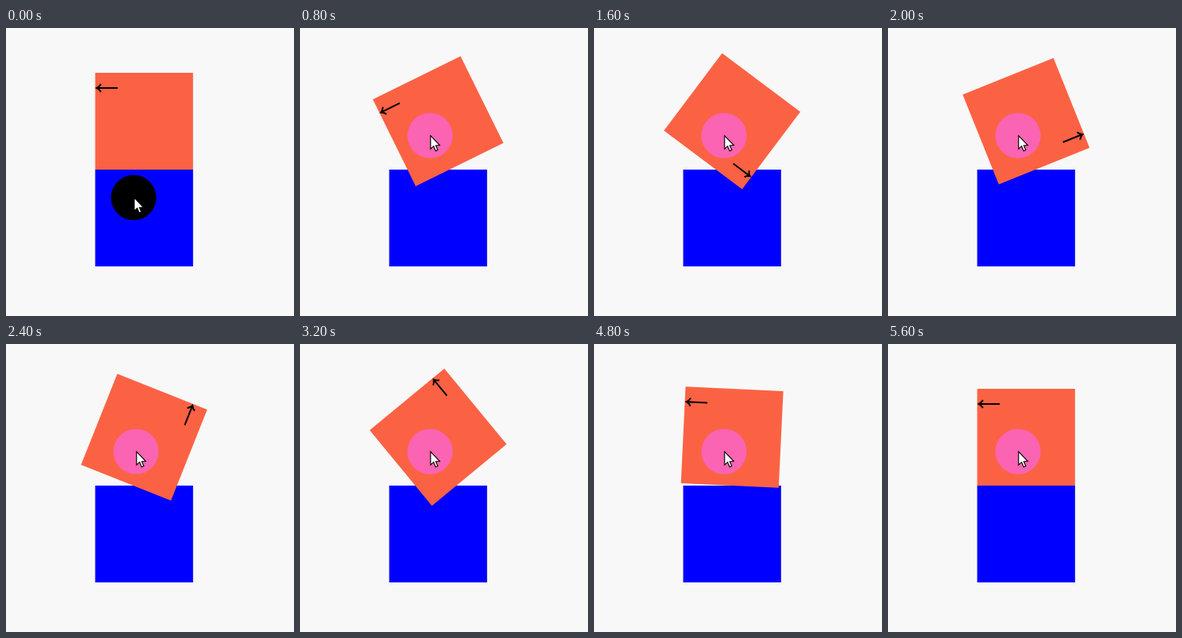
Recreate the animation shown at these times as an HTML page with a canvas. Size 360 by 360 pixels, loop 6.6 s.

```html
<!DOCTYPE html>
<html lang="en">
<head>
<meta charset="utf-8">
<title>Rotating square</title>
<style>
  html, body { margin: 0; width: 100%; height: 100%; overflow: hidden; background: #f8f8f8; }
  canvas { display: block; width: 360px; height: 360px; }
</style>
</head>
<body>
<canvas id="stage"></canvas>
<script>
const LOOP = 6600, STEP = 200;
const SPIN_START = 375, SPIN_TIME = 5000;
const BOX = { x: 111.5, y: 56, w: 122.3, h: 121 };
const MID = { x: BOX.x + BOX.w / 2, y: BOX.y + BOX.h / 2 };
const FLOOR = BOX.y + BOX.h;

const canvas = document.getElementById('stage');
const ctx = canvas.getContext('2d');
const ratio = window.devicePixelRatio || 1;
canvas.width = canvas.height = 360 * ratio;
ctx.scale(ratio, ratio);

const clamp = v => Math.min(1, Math.max(0, v));
const mix = (a, b, u) => a + (b - a) * u;
const smooth = u => u * u * (3 - 2 * u);

// CSS "ease": cubic-bezier(.25, .1, .25, 1)
function ease(x) {
  if (x <= 0 || x >= 1) return clamp(x);
  let lo = 0, hi = 1;
  for (let i = 0; i < 30; i++) {
    const s = (lo + hi) / 2;
    if (0.75 * s * (1 - s) + s ** 3 < x) lo = s; else hi = s;
  }
  const s = lo, r = 1 - s;
  return 0.3 * s * r * r + 3 * s * s * r + s ** 3;
}

function trace(points) {
  ctx.beginPath();
  points.forEach(([x, y]) => ctx.lineTo(x, y));
}

function drawArrow(x, y) {
  ctx.save();
  ctx.translate(x, y);
  ctx.strokeStyle = '#080404';
  ctx.lineWidth = 2;
  trace([[1, 0], [27, 0]]);
  ctx.stroke();
  ctx.beginPath();
  ctx.moveTo(6, -5);
  ctx.quadraticCurveTo(4, -1.5, 0.8, 0);
  ctx.quadraticCurveTo(4, 1.5, 6, 5);
  ctx.stroke();
  ctx.restore();
}

function drawSquare(angle) {
  ctx.save();
  ctx.translate(MID.x, MID.y);
  ctx.rotate(angle);
  ctx.translate(-MID.x, -MID.y);
  ctx.fillStyle = '#fb6244';
  ctx.fillRect(BOX.x, BOX.y, BOX.w, BOX.h);
  drawArrow(112.7, 75);
  ctx.restore();
}

function drawPointer(x, y) {
  ctx.save();
  ctx.translate(x, y);
  trace([[0, 0], [0, 16.5], [3.8, 13], [6.4, 19], [9, 17.8], [6.5, 12.2], [11.5, 11.8]]);
  ctx.closePath();
  ctx.fillStyle = '#fff';
  ctx.fill();
  ctx.strokeStyle = '#000';
  ctx.lineWidth = 1.1;
  ctx.stroke();
  ctx.restore();
}

function draw(t) {
  ctx.fillStyle = '#f8f8f8';
  ctx.fillRect(0, 0, 360, 360);

  ctx.fillStyle = '#0000fe';
  ctx.fillRect(BOX.x, FLOOR, BOX.w, BOX.h);
  drawSquare(-2 * Math.PI * ease((t - SPIN_START) / SPIN_TIME));

  const u = smooth(clamp((t - 100) / 500));
  const x = mix(159.5, 162.5, u), y = mix(212, 134.5, u);
  ctx.fillStyle = y < FLOOR ? '#fa64b2' : '#000';
  ctx.beginPath();
  ctx.arc(x, y, 28.3, 0, 2 * Math.PI);
  ctx.fill();
  drawPointer(x + 0.7, y + 0.2);
}

const start = performance.now();
function tick() {
  const t = (performance.now() - start) % LOOP;
  draw(Math.floor(t / STEP) * STEP);
  requestAnimationFrame(tick);
}
tick();
</script>
</body>
</html>
```
